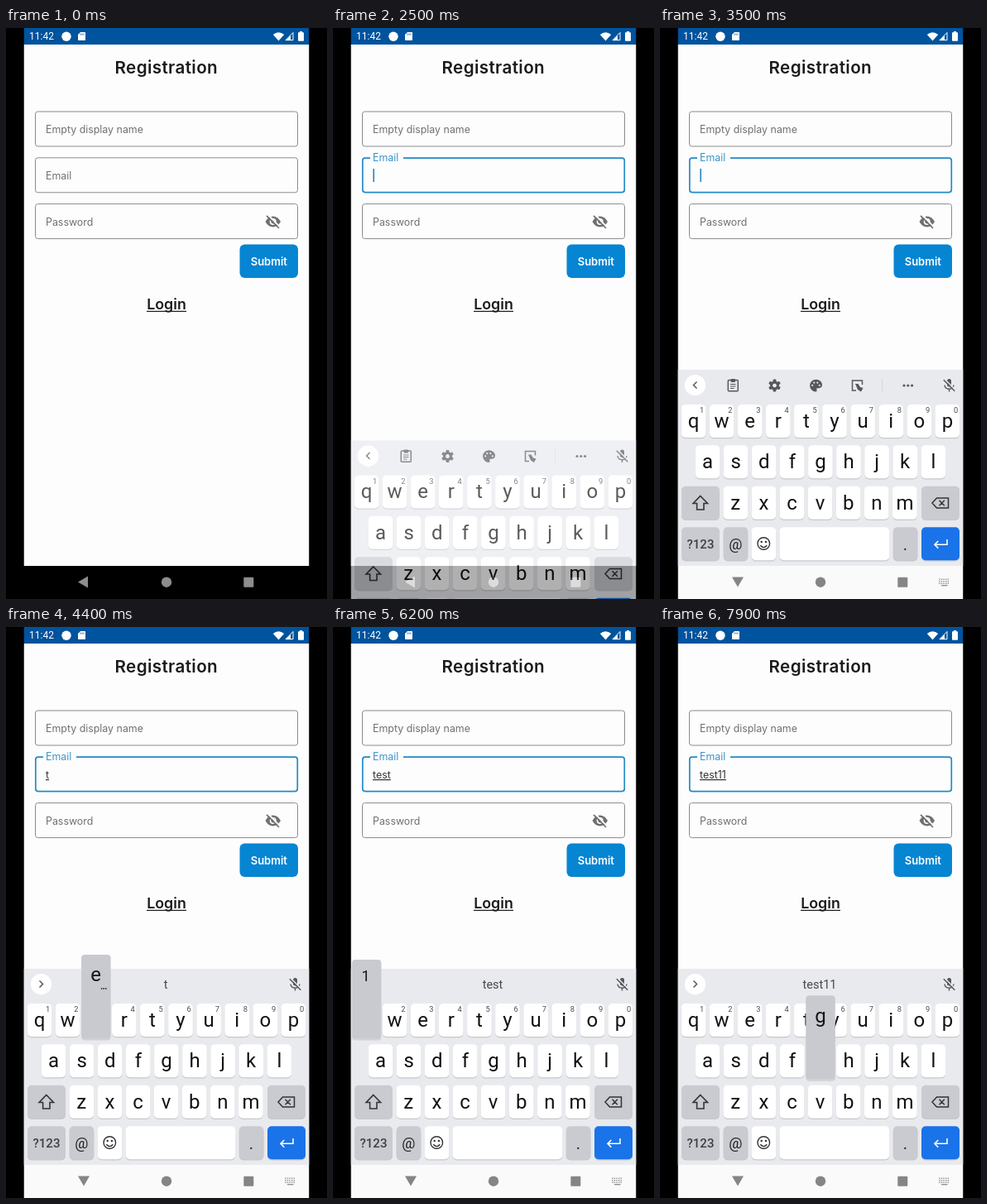
An HTML page for the animation above (8 s loop, 388x690 px).

```html
<!DOCTYPE html>
<html lang="en">
<head>
<meta charset="utf-8">
<title>Registration form</title>
<style>
  html, body { margin: 0; width: 100%; height: 100%; overflow: hidden; background: #000; }
  svg { display: block; width: 100vw; height: 100vh; }
  .ui { font-family: Inter, "Open Sans", sans-serif; }
  .kb { font-family: Roboto, Arial, sans-serif; }
</style>
</head>
<body>
<svg id="stage" viewBox="0 0 388 690"></svg>
<script>
const LOOP = 8000;
const PITCH = 34.1;
const GREY = '#55585d';
const BLUE = '#2389c6';

const rect = (x, y, w, h, fill, r = 0, extra = '') =>
  `<rect x="${x}" y="${y}" width="${w}" height="${h}" rx="${r}" fill="${fill}" ${extra}/>`;
const circle = (x, y, r, fill, extra = '') =>
  `<circle cx="${x}" cy="${y}" r="${r}" fill="${fill}" ${extra}/>`;
const shape = (d, fill, extra = '') => `<path d="${d}" fill="${fill}" ${extra}/>`;
const line = (d, color, width = 1.5, extra = '') =>
  `<path d="${d}" fill="none" stroke="${color}" stroke-width="${width}" ${extra}/>`;
const text = (str, x, y, size, fill, extra = '') =>
  `<text x="${x}" y="${y}" font-size="${size}" fill="${fill}" ${extra}>${str}</text>`;
const middle = 'text-anchor="middle"';
const group = (id, body, extra = '') => `<g id="${id}" ${extra}>${body}</g>`;

// Key positions
const rows = [
  { keys: 'qwertyuiop', x: 40.5, y: 455 },
  { keys: 'asdfghjkl', x: 57.5, y: 504.3 },
  { keys: 'zxcvbnm', x: 91.3, y: 553.7 }
];
const keyAt = {};
rows.forEach(({ keys, x, y }) =>
  [...keys].forEach((key, i) => keyAt[key] = { x: x + i * PITCH, y }));

const keyCap = (x, y, w, fill = '#fff') =>
  rect(x, y + 1.2, w, 40, '#c6c8cd', 5) + rect(x, y, w, 40, fill, 5);

function statusBar() {
  return rect(21.5, 0, 345, 20, '#00539d') +
    text('11:42', 28, 14.4, 12, '#fff', 'class="kb"') +
    circle(73, 10.3, 5.7, '#fff') +
    shape('M90 5h5.2q.8 0 .8.8v8.4q0 .8-.8.8h-7.4q-.8 0-.8-.8V8z', '#fff') +
    line('M90 6.5v2.2M92 6.5v2.2M94 6.5v2.2', '#00539d', .8) +
    shape('M322.8 8Q329.5 2.6 336.2 8L329.5 15.5z', '#fff') +
    line('M338 14.7L347 5.5V14.7z', '#fff', 1) +
    shape('M338 15L344 9V15z', '#fff') +
    rect(353, 5.3, 7, 10.5, '#fff', .8) + rect(355, 4, 3, 2, '#fff');
}

function field(y, label) {
  return rect(35.5, y, 317, 42, 'none', 3, 'stroke="#8b8b8b"') +
    (label ? text(label, 48, y + 26.2, 12.4, '#717171') : '');
}

function eyeOff() {
  return shape('M313.5 234Q317 227.5 322.7 227.5T332 234Q328.4 240.5 322.7 240.5T313.5 234z', '#707070') +
    circle(322.7, 234, 3.2, '#707070', 'stroke="#fdfdfd" stroke-width="1.6"') +
    line('M316.5 225.5L331.5 240.8', '#fdfdfd', 1.8) +
    line('M315 226.8L330 242', '#707070', 1.7);
}

function form() {
  return rect(21.5, 20, 345, 630, '#fdfdfd') +
    text('Registration', 193.8, 55, 20.6, '#1b1b1b', `${middle} font-weight="600" letter-spacing=".4"`) +
    field(101, 'Empty display name') +
    group('idleBorder', field(156.8)) +
    group('focusBorder',
      rect(35.8, 157.2, 316.5, 41.4, 'none', 3, `stroke="${BLUE}" stroke-width="1.7"`) +
      rect(45, 155, 40, 5, '#fdfdfd')) +
    text('Email', 48, 0, 12.4, '#717171', 'id="label"') +
    text('', 48, 183, 12.4, '#333', 'id="typed" text-decoration="underline"') +
    rect(48.4, 170, 1.6, 16, BLUE, 0, 'id="caret"') +
    field(212.6, 'Password') + eyeOff() +
    rect(282.5, 261.6, 70.5, 40.4, '#0685d2', 6) +
    text('Submit', 317.8, 286.8, 13, '#fff', `${middle} font-weight="600"`) +
    text('Login', 194, 340, 17.8, '#1b1b1b', `${middle} font-weight="600"`) +
    rect(170, 341.8, 48, 1.2, '#1b1b1b');
}

function navDark() {
  return rect(21.5, 650, 345, 40, '#000') +
    shape('M87 669.5L99 662.5V676.5z', '#8d8d8d') +
    circle(194, 669.7, 6.2, '#8d8d8d') + rect(287.3, 663.7, 12, 12, '#8d8d8d', 1);
}

function navLight() {
  let dots = '';
  for (let i = 0; i < 15; i++) dots += rect(337.2 + (i % 5) * 2.6, 665.5 + Math.floor(i / 5) * 2.5, 1.4, 1.4, '#8d8d8d');
  return shape('M87 663.5H101L94 675.5z', '#858585') +
    circle(194, 669.7, 6.2, '#858585') + rect(287.3, 663.7, 12, 12, '#858585', 1) +
    dots + rect(340, 673, 7.5, 1.3, '#8d8d8d');
}

function toolIcons() {
  let teeth = '';
  for (let a = 0; a < 360; a += 60) teeth += rect(136.6, 424.6, 3.8, 5, GREY, .8, `transform="rotate(${a} 138.5 432)"`);
  return line('M44.5 427.5L40.5 431.5L44.5 435.5', GREY) +
    rect(82.3, 425.5, 12, 13.3, 'none', 1, `stroke="${GREY}" stroke-width="1.5"`) +
    rect(85.5, 424, 5.6, 4, GREY, 1) + line('M85 430.5h6.5M85 433h6.5M85 435.5h4.5', GREY, 1.1) +
    teeth + circle(138.5, 432, 4, 'none', `stroke="${GREY}" stroke-width="3"`) +
    shape('M188.5 424.8C193 424.8 196 427.8 196 431.2C196 434 194 435.2 191.7 435.2H190.5C189 435.2 189 436.5 189.5 437.3C190 438.5 189.3 439.4 188.3 439.4A7.3 7.3 0 0 1 188.5 424.8z', GREY) +
    [[184.2, 431.8], [186.3, 428.6], [190.3, 428.6], [192.8, 431.8]].map(([x, y]) => circle(x, y, 1.1, '#e8eaee')).join('') +
    line('M237 438H232.5V426H244.5V431', GREY) + shape('M236 430H239.5L242 434L245.5 435L243 439.5L239 437z', GREY) +
    rect(268, 423, 1, 17, '#d6d8dc') +
    [295, 299.8, 304.6].map(x => circle(x, 432, 1.6, GREY)).join('');
}

function micOff() {
  return rect(347, 424, 5, 9.5, GREY, 2.5) +
    line('M344 431.5Q344.5 436 349.5 436.3Q354.5 436 355 431.5M349.5 436v3.5', GREY, 1.4) +
    line('M344 424.3L357 437.3', '#e8eaee', 1.6) + line('M342.8 425.2L356.3 438.8', GREY, 1.5);
}

function keyboard() {
  let keys = '';
  rows.forEach((row, r) => [...row.keys].forEach((key, i) => {
    const { x, y } = keyAt[key];
    keys += keyCap(x - 14.8, y, 29.6) + text(key, x, y + 27.8, 24, '#121212', middle);
    if (r === 0) keys += text((i + 1) % 10, x + 10.2, 465.4, 9.3, '#4a4a4a', middle);
  }));
  const soft = '#c9cbd0';
  return rect(21.5, 413, 345, 237, '#e8eaee') + rect(21.5, 650, 345, 41, '#fafafa') +
    circle(42.5, 431.7, 12.6, '#fff') + micOff() +
    group('tools', toolIcons()) +
    group('suggest', line('M40.5 427.5L44.5 431.5L40.5 435.5', GREY) +
      text('', 193, 437.2, 14.5, '#45484c', `id="word" ${middle}`)) +
    keys +
    keyCap(26, 553.7, 46, soft) + keyCap(316, 553.7, 46, soft) +
    line('M48.8 565.5L57.5 574.5H53V582H44.6V574.5H40.1z', '#333', 1.6) +
    line('M334.5 568H348.5V580H334.5L329 574zM337.5 570.8l6.4 6.4M343.9 570.8l-6.4 6.4', '#333', 1.5) +
    keyCap(26, 603.2, 46, soft) + keyCap(76.7, 603.2, 29.6, soft) + keyCap(110.6, 603.2, 29.6) +
    keyCap(144.6, 603.2, 132.6) + keyCap(281.8, 603.2, 29.6, soft) + keyCap(316, 603.2, 46, '#1a73e8') +
    text('?123', 49, 629, 15, '#3c3f43', `${middle} font-weight="500"`) +
    text('@', 91.4, 630, 18, '#222', middle) + text('.', 296.5, 631, 20, '#222', middle) +
    circle(125.3, 623, 7.3, 'none', 'stroke="#333" stroke-width="1.4"') +
    circle(122.7, 621, 1.2, '#333') + circle(127.9, 621, 1.2, '#333') +
    line('M121.3 625.2Q125.3 630 129.3 625.2', '#333', 1.4) +
    line('M347 618V624.3H332.5M336.3 620L332 624.3L336.3 628.6', '#fff', 1.6);
}

function popupMarkup([key, , , shown]) {
  const { x, y } = keyAt[key];
  const alt = shown !== undefined;
  const top = y - (alt ? 53 : 59);
  return rect(x - 17.6, top + 1.5, 35.4, y + 43 - top, '#888', 4, 'opacity=".25"') +
    rect(x - 17.6, top, 35.4, y + 42 - top, '#c9cad0', 4) +
    text(alt ? shown : key, x - (alt ? 1 : 0), y - 26.7, alt ? 18 : 24, '#161616', middle) +
    (!alt && y === 455 ? [-2.6, 0, 2.6].map(d => circle(x + 9.5 + d, 437, .9, '#333')).join('') : '');
}

// [key, from, to, shown instead]
const presses = [
  ['t', 3700, 3900], ['e', 4300, 4500], ['s', 4700, 4800], ['t', 5000, 5100],
  ['q', 5800, 6100], ['q', 6100, 6600, '1'],
  ['q', 6700, 7000], ['q', 7000, 7600, '1'], ['g', 7900, 8000]
];
const typing = [[3900, 't'], [4500, 'te'], [4800, 'tes'], [5100, 'test'], [6500, 'test1'], [7500, 'test11']];
const typedAt = t => typing.reduce((word, [time, next]) => t >= time ? next : word, '');

const stage = document.getElementById('stage');
stage.innerHTML =
  '<defs><clipPath id="screen"><rect x="21.5" width="345" height="690"/></clipPath></defs>' +
  rect(0, 0, 388, 690, '#000') +
  '<g clip-path="url(#screen)">' +
  group('app', statusBar() + form(), 'class="ui"') + navDark() +
  group('board', keyboard(), 'class="kb"') + group('nav', navLight()) +
  group('popup', '', 'class="kb"') + '</g>';
const el = Object.fromEntries([...stage.querySelectorAll('[id]')].map(node => [node.id, node]));

const clamp = v => Math.max(0, Math.min(1, v));
const show = (node, visible) => node.setAttribute('visibility', visible ? 'inherit' : 'hidden');
const setText = (node, value) => { if (node.textContent !== value) node.textContent = value; };

// cubic-bezier(.4, 0, .2, 1)
function ease(x) {
  let lo = 0, hi = 1;
  for (let i = 0; i < 20; i++) {
    const s = (lo + hi) / 2, r = 1 - s;
    if (1.2 * r * r * s + .6 * r * s * s + s * s * s < x) lo = s; else hi = s;
  }
  return 3 * (1 - lo) * lo * lo + lo ** 3;
}

let lastPress;
function render(t) {
  const step = t + 15;
  const focused = step >= 2000;
  const word = typedAt(step);
  show(el.idleBorder, !focused);
  show(el.focusBorder, focused);

  const float = ease(clamp((t - 1960) / 170));
  el.label.setAttribute('y', 183 - 21.7 * float);
  el.label.setAttribute('fill', focused ? '#3c95cc' : '#717171');
  show(el.caret, focused && !word && (step - 2300 + 1000) % 1000 < 500);
  setText(el.typed, word);

  const slide = ease(clamp((t - 2375) / 285));
  el.board.setAttribute('transform', `translate(0 ${277 * (1 - slide)})`);
  el.board.setAttribute('opacity', slide);
  el.nav.setAttribute('opacity', clamp((t - 2600) / 200));

  show(el.tools, !word);
  show(el.suggest, word);
  setText(el.word, typedAt(step - 100) || word);

  const press = presses.find(([, from, to]) => step >= from && step < to);
  if (press !== lastPress) {
    el.popup.innerHTML = press ? popupMarkup(press) : '';
    lastPress = press;
  }
}

const start = performance.now();
function tick() {
  render((performance.now() - start) % LOOP);
  requestAnimationFrame(tick);
}
tick();
</script>
</body>
</html>
```
